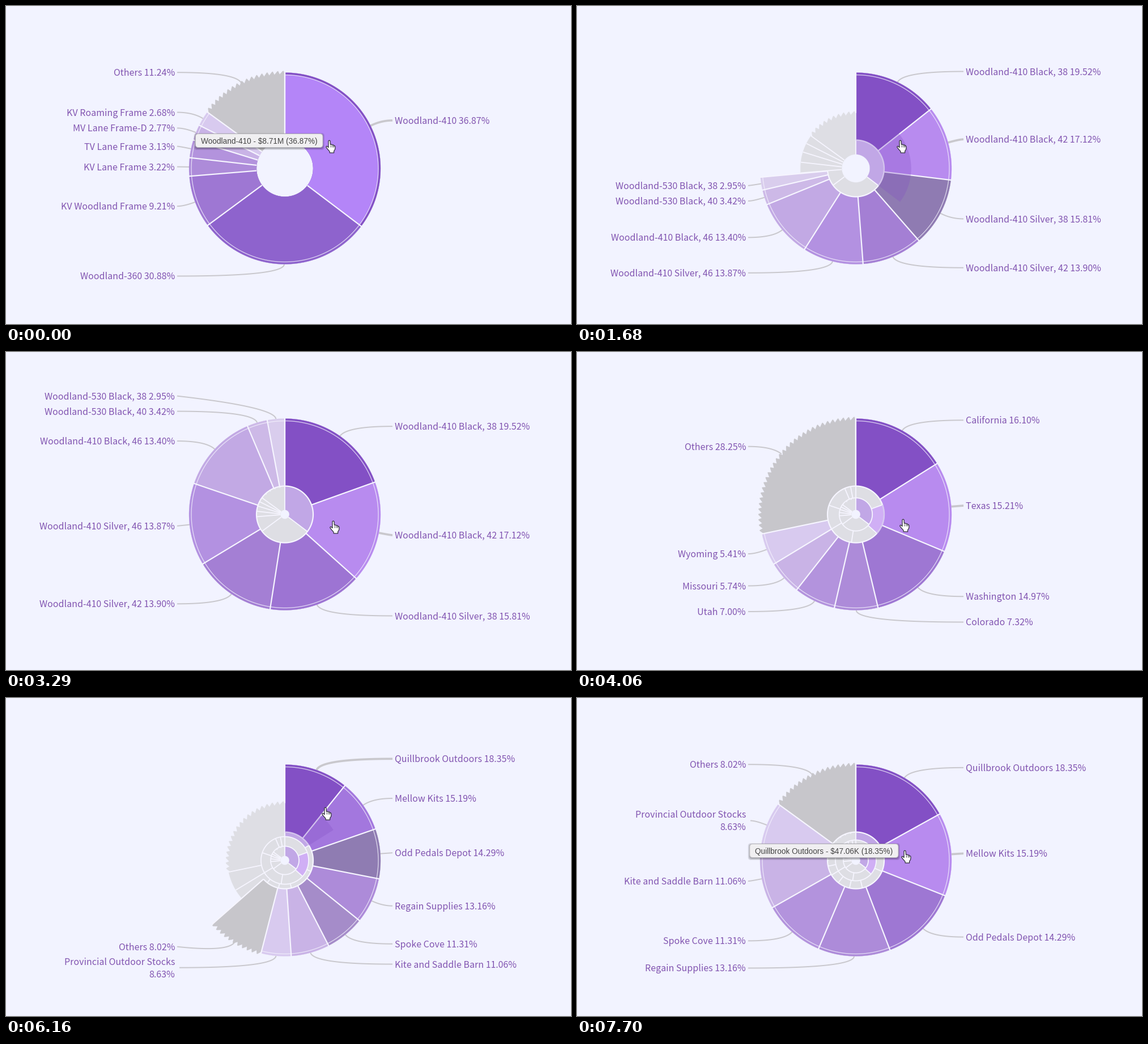
These frames come from a looping animation (997 by 561 pixels, 8 s). A matplotlib script:

```python
import numpy as np
import matplotlib.pyplot as plt
from matplotlib.animation import FuncAnimation
from matplotlib.collections import LineCollection, PolyCollection
from matplotlib.colors import to_rgb
from matplotlib.patches import FancyBboxPatch, Polygon

W, H, DPI = 997, 561, 64
PX = 72 / DPI  # points per pixel
LOOP, STEP = 8000, 40

CX, CY = 492, 286.5
R_OUT, R_IN, R_HOLE, R_LABEL = 169, 50, 8, 190
BG, WHITE = "#f2f3ff", "#f6f5ff"
GREY, FADED = "#c7c6cb", "#dedee4"
HOVER_FIRST, HOVER, DIM = "#b485f8", "#b88bef", "#887fa2"
INK, LEADER = "#8255b1", "#c9c8cd"

SHADES_8 = ["#8350c5", "#8f63ce", "#9d74d3", "#a47fd4",
            "#b391e1", "#c2a9e4", "#cdb9e7", "#d9cded"]
SHADES_7 = ["#8350c5", "#8e63cd", "#9e77d3", "#ad8bd9",
            "#b393dd", "#c9b3e6", "#d8caef", GREY]


class Ring:
    def __init__(self, items, picked=None, tint=None):
        self.names = [name for name, _ in items]
        self.values = [value for _, value in items]
        self.others = self.names[-1] == "Others"
        self.colors = SHADES_7 if self.others else SHADES_8
        self.picked, self.tint = picked, tint
        share = np.array(self.values) / sum(self.values)
        if self.others and share[-1] < 0.15:
            share[:-1] *= 0.85 / (1 - share[-1])
            share[-1] = 0.15
        self.edges = 2 * np.pi * np.concatenate([[0], np.cumsum(share)])

    def label(self, i):
        name = self.names[i]
        gap = "\n" if len(name) > 23 else " "
        return f"{name}{gap}{self.values[i]:.2f}%"

    def toothed(self, i):
        return self.others and i == len(self.names) - 1

    def lit(self, i):
        return HOVER if i else HOVER_FIRST


RINGS = [
    Ring([("Woodland-410", 36.87), ("Woodland-360", 30.88),
          ("KV Woodland Frame", 9.21), ("KV Lane Frame", 3.22),
          ("TV Lane Frame", 3.13), ("MV Lane Frame-D", 2.77),
          ("KV Roaming Frame", 2.68), ("Others", 11.24)], 0, "#c1a7e6"),
    Ring([("Woodland-410 Black, 38", 19.52), ("Woodland-410 Black, 42", 17.12),
          ("Woodland-410 Silver, 38", 15.81), ("Woodland-410 Silver, 42", 13.90),
          ("Woodland-410 Silver, 46", 13.87), ("Woodland-410 Black, 46", 13.40),
          ("Woodland-530 Black, 40", 3.42), ("Woodland-530 Black, 38", 2.95)],
         1, "#d0aff5"),
    Ring([("California", 16.10), ("Texas", 15.21), ("Washington", 14.97),
          ("Colorado", 7.32), ("Utah", 7.00), ("Missouri", 5.74),
          ("Wyoming", 5.41), ("Others", 28.25)], 0, "#c1a7e6"),
    Ring([("Quillbrook Outdoors", 18.35), ("Mellow Kits", 15.19),
          ("Odd Pedals Depot", 14.29), ("Regain Supplies", 13.16),
          ("Spoke Cove", 11.31), ("Kite and Saddle Barn", 11.06),
          ("Provincial Outdoor Stocks", 8.63), ("Others", 8.02)]),
]

DRILLS = [(1311, 90), (3290, 60), (5859, 39)]  # start, delay of the shrinking
DRILL_MS = 760
MOVES = [(2100, 2560, 577, 298), (3300, 3900, 575, 295),
         (4130, 4700, 563, 193), (6720, 7210, 578, 269)]
TIPS = [(0, 1260, "Woodland-410 - $8.71M (36.87%)"),
        (4800, 5740, "Texas - $242.25K (15.21%)"),
        (7380, LOOP, "Quillbrook Outdoors - $47.06K (18.35%)")]


def ease_out(x):
    return 1 - (1 - np.clip(x, 0, 1)) ** 2


def mix(a, b, u):
    return tuple(np.array(to_rgb(a)) * (1 - u) + np.array(to_rgb(b)) * u)


def polar(r, a):
    return np.column_stack([CX + r * np.sin(a), CY - r * np.cos(a)])


def arc(r, a0, a1):
    return polar(r, np.linspace(a0, a1, max(3, int((a1 - a0) * 30))))


def sector(r0, r1, a0, a1, toothed=False):
    if toothed:
        n = max(1, round((a1 - a0) * r1 / 9.4))
        saw = np.arange(n)[:, None] + np.array([0, 0.6, 0.75])
        angles = a0 + (a1 - a0) * np.append(saw.ravel(), n) / n
        radii = np.append(np.tile([-3, 2.5, 3], n), -3) + r1
        outer = polar(radii, angles)
    else:
        outer = arc(r1, a0, a1)
    return np.vstack([outer, arc(r0, a0, a1)[::-1]])


def state(t):
    """Depth, sweep of the new ring, shrinking of the old ones."""
    depth, p, q = 0, 1.0, 1.0
    for k, (start, lag) in enumerate(DRILLS, 1):
        if t >= start:
            depth = k
            p = max(0.004, ease_out((t - start) / DRILL_MS))
            q = ease_out((t - start - lag) / DRILL_MS)
    return depth, p, q


def bounds(k, depth):
    if k == depth:
        return np.array([R_IN, R_OUT], float)
    return R_HOLE + (R_IN - R_HOLE) * np.array([k, k + 1]) / depth


def pointer(t):
    pos = np.array([570.0, 237.0])
    for t0, t1, x, y in MOVES:
        u = np.clip((t - t0) / (t1 - t0), 0, 1)
        pos += (np.array([x, y]) - pos) * u * u * (3 - 2 * u)
    return pos


def hovered(t):
    """Depth and index of the slice under the pointer."""
    depth, p, _ = state(t)
    x, y = pointer(t)
    angle = np.arctan2(x - CX, CY - y) % (2 * np.pi)
    return depth, int(np.searchsorted(RINGS[depth].edges * p, angle)) - 1


def trail(t, *lags):
    return [hovered(max(0, t - lag)) for lag in lags]


def label_spots(ring, mids):
    """Label heights, kept apart on each side."""
    spots, last = [], {}
    for i, a in enumerate(mids):
        side = 1 if a < np.pi else -1
        y = CY - R_LABEL * np.cos(a)
        half = 23.5 if "\n" in ring.label(i) else 13.5
        if side in last:
            y0, half0 = last[side]
            edge = y0 + side * (half0 + half)
            y = max(y, edge) if side > 0 else min(y, edge)
        last[side] = (y, half)
        spots.append((side, y))
    return spots


def leader(y, a, x0):
    u = np.linspace(0, 1, 24)[:, None]
    start = np.array([x0, y])
    bend, end = polar(np.array([R_LABEL, R_OUT]), a)
    return (1 - u) ** 2 * start + 2 * u * (1 - u) * bend + u ** 2 * end


fig = plt.figure(figsize=(W / DPI, H / DPI), dpi=DPI, facecolor=BG)
ax = fig.add_axes([0, 0, 1, 1])
ax.set(xlim=(0, W), ylim=(H, 0))
ax.axis("off")


def polys(z):
    return ax.add_collection(PolyCollection([], linewidths=0.3 * PX, zorder=z))


def lines(color, width, z, alpha=1):
    return ax.add_collection(LineCollection(
        [], colors=color, linewidths=width * PX, alpha=alpha, zorder=z))


leaders = lines(LEADER, 2, 1)
inner_fill, inner_line = polys(2), lines(WHITE, 1.8, 3)
outer_fill = polys(4)
rim_line = lines(WHITE, 1.3, 5, 0.75)
outer_line = lines(WHITE, 2.2, 6)
veil = ax.add_patch(Polygon([(0, 0)] * 3, lw=0, alpha=0.3, zorder=6.5))

labels = [ax.text(0, 0, "", family=["Noto Sans CJK JP", "DejaVu Sans"],
                  size=16 * PX, color=INK, va="center", linespacing=1.38, zorder=7)
          for _ in range(8)]


def box(z, **style):
    return ax.add_patch(FancyBboxPatch(
        (0, 0), 1, 1, boxstyle="round,pad=0,rounding_size=5", zorder=z, **style))


shadows = [box(8, fc="black", ec="none", alpha=0.09) for _ in range(4)]
tip_box = box(9, fc="#f0eff1", ec="#b9b8bd", lw=PX)
tip_text = ax.text(0, 0, "", family="Liberation Sans", size=13.6 * PX,
                   color="#454545", ha="right", va="center", zorder=10)
tip_parts = shadows + [tip_box, tip_text]


def text_width(text):
    tip_text.set_text(text)
    return tip_text.get_window_extent(fig.canvas.get_renderer()).width


TIP_WIDTH = {text: text_width(text) for _, _, text in TIPS}

HAND = np.array([
    (5, 2), (6.5, 1), (8, 2), (8.5, 8.5), (10.5, 8), (12, 9.2), (13.8, 9),
    (15, 10.5), (16.6, 11), (17, 13), (16.6, 17), (14.6, 20), (14.6, 23),
    (7.2, 23), (7, 20.5), (3, 16), (0.8, 13), (1.4, 11.4), (3, 11.6), (5, 13.6),
]) - (6, 1)
hand = ax.add_patch(Polygon(HAND, fc="white", ec="#2c2c34", lw=1.2 * PX,
                            joinstyle="round", zorder=11))
knuckles = lines("#2c2c34", 0.9, 12)


def draw_inner(depth, q):
    fills, colors, strokes = [], [], []
    veil.set_visible(depth > 0 and q < 1)
    for k in range(depth):
        ring = RINGS[k]
        r0, r1 = bounds(k, depth - 1) * (1 - q) + bounds(k, depth) * q
        fade = min(1, 3 * q) if k == depth - 1 else 1
        for i, (a0, a1) in enumerate(zip(ring.edges, ring.edges[1:])):
            picked = i == ring.picked
            fills.append(sector(r0, r1, a0, a1, ring.toothed(i)))
            colors.append(mix(ring.lit(i) if picked else ring.colors[i],
                              ring.tint if picked else FADED, fade))
            strokes.append(polar(np.array([r0, r1]), a0))
            # the chosen slice shrinks in front of the new ring
            if picked and k == depth - 1:
                veil.set_xy(sector(R_IN - 1, r1, a0, a1))
                veil.set_facecolor(ring.colors[i])
        if k:
            strokes.append(arc(r0, 0, 2 * np.pi))
    inner_fill.set_verts(fills)
    inner_fill.set_color(colors)
    inner_line.set_segments(strokes)


def draw_outer(t, depth, p):
    ring = RINGS[depth]
    edges = ring.edges * p
    now = hovered(t)
    recent, older = trail(t, 60, 100, 140), trail(t, 165, 200, 235)
    fills, colors, rims, strokes = [], [], [], []
    for i, (a0, a1) in enumerate(zip(edges, edges[1:])):
        base, toothed = ring.colors[i], ring.toothed(i)
        color, here = to_rgb(base), (depth, i)
        if not toothed:
            # light up under the pointer, dim shortly after it has left
            glow = recent.count(here) / 3 * (1 if here == now else 0.5)
            dim = 0 if here == now else older.count(here) / 3
            color = mix(mix(base, ring.lit(i), glow), DIM, dim * (1 - glow))
        fills.append(sector(R_IN, R_OUT, a0, a1, toothed))
        colors.append(to_rgb(base) if i == 0 else color)
        if not toothed:
            fills.append(sector(R_IN, R_OUT - 4, a0, a1))
            colors.append(color)
            rims.append(arc(R_OUT - 4, a0, a1))
        strokes.append(polar(np.array([R_IN, R_OUT + 1]), a0))
    strokes.append(polar(np.array([R_IN, R_OUT + 1]), edges[-1]))
    if depth:
        strokes.append(arc(R_IN, 0, edges[-1]))
    outer_fill.set_verts(fills)
    outer_fill.set_color(colors)
    rim_line.set_segments(rims)
    outer_line.set_segments(strokes)


def draw_labels(t, depth, p):
    ring = RINGS[depth]
    mids = (ring.edges[:-1] + ring.edges[1:]) / 2 * p
    active = hovered(t)[1]
    curves, widths = [], []
    for i, (side, y) in enumerate(label_spots(ring, mids)):
        text = ring.label(i)
        align = "left" if side > 0 else "right"
        labels[i].set(text=text, ha=align, ma=align,
                      position=(686 if side > 0 else 298, y + 1.5))
        x0 = 682 if side > 0 else (306 if "\n" in text else 302)
        curves.append(leader(y, mids[i], x0))
        widths.append((3.7 if i == active else 2) * PX)
    leaders.set_segments(curves)
    leaders.set_linewidths(widths)


def draw_tip(t, x, y):
    text = next((s for t0, t1, s in TIPS if t0 <= t < t1), None)
    for part in tip_parts:
        part.set_visible(text is not None)
    if text is None:
        return
    width = TIP_WIDTH[text] + 19
    left, top = x - 11 - width, y - 11.5
    tip_box.set_bounds(left, top, width, 24)
    for g, shadow in enumerate(shadows):
        shadow.set_bounds(left - g, top - g + 1.5, width + 2 * g, 24 + 2 * g)
    tip_text.set(text=text, position=(left + width - 9.5, y + 1.5))


def update(frame):
    t = frame * STEP
    depth, p, q = state(t)
    x, y = pointer(t)
    draw_inner(depth, q)
    draw_outer(t, depth, p)
    draw_labels(t, depth, p)
    draw_tip(t, x, y)
    hand.set_xy(HAND + (x, y))
    knuckles.set_segments([[(x + dx, y + 8), (x + dx, y + 11.5)]
                           for dx in (2.5, 5.5, 8.3)])
    return []


anim = FuncAnimation(fig, update, frames=LOOP // STEP, interval=STEP,
                     repeat=True, repeat_delay=0, blit=False)
plt.show()
```
